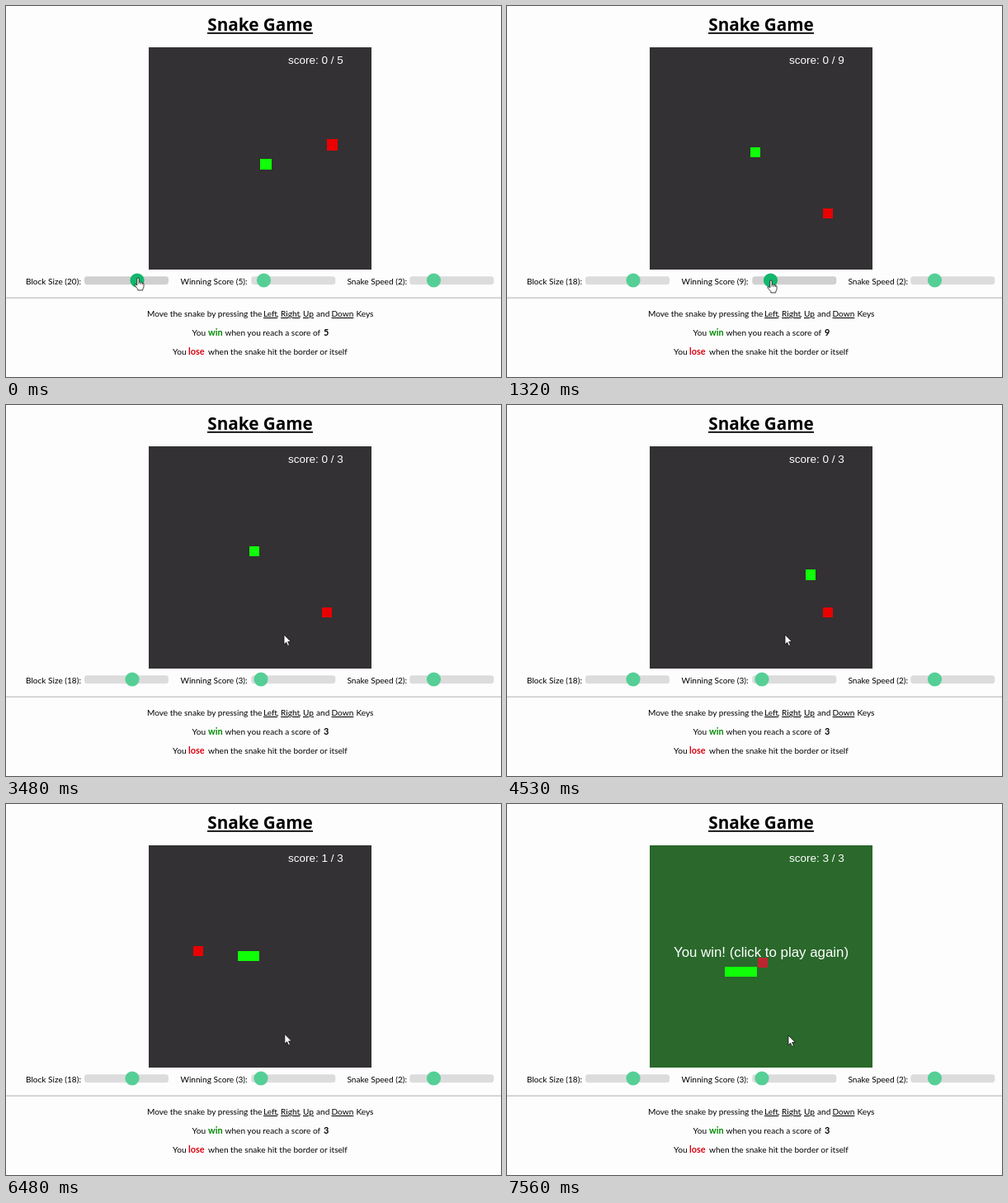
Write an HTML page that moves like this. It is 600 by 449 pixels and loops after 7590 ms.

```html
<!DOCTYPE html>
<html lang="en">
<head>
<meta charset="utf-8">
<title>Snake Game</title>
<style>
  html, body { margin: 0; width: 100%; height: 100%; overflow: hidden; background: #fefdfe; }
  svg { display: block; width: 600px; height: 449px; }
  text { font: 10.1px Lato, sans-serif; fill: #000; white-space: pre; }
  .title { font: 700 20.7px "Open Sans", sans-serif; text-anchor: middle; }
  .key { text-decoration: underline; text-underline-offset: 1.5px; }
  .bold { font-size: 10.9px; font-weight: 700; }
  .win { fill: #008a00; }
  .lose { fill: #d8000c; }
  .board { font: 13.5px "Liberation Sans", Arial, sans-serif; fill: #fff; }
  .banner { font-size: 16.875px; text-anchor: middle; }
  .track { fill: #dcdcdd; }
  .thumb { fill: #55cf96; }
  .hover .track { fill: #d0d0d1; }
  .hover .thumb { fill: #12b76c; }
  #canvas, #food, #snake { shape-rendering: crispEdges; }
</style>
</head>
<body>
<svg id="stage" viewBox="0 0 600 449">
  <text class="title" x="308" y="30">Snake Game</text>
  <path d="M244 32.9H372" stroke="#000" stroke-width="1.8"/>
  <rect id="canvas" x="173" y="50" width="270" height="269"/>
  <rect id="food"/>
  <path id="snake" fill="#10ff08"/>
  <text id="score" class="board" x="342" y="69.7"></text>
  <text id="banner" class="board banner" x="308" y="184.5">You win! (click to play again)</text>
  <g id="sliders"></g>
  <path d="M0 353.3H600" stroke="#c9c9ca" stroke-width="1.4"/>
  <g id="help"></g>
  <g id="cursor" fill="#fff" stroke="#111" stroke-width=".8" stroke-linejoin="round">
    <path id="arrow" d="M0 0V11.8L2.7 9.3L4.5 13.4L6.5 12.5L4.7 8.5H8.4Z"/>
    <g id="hand">
      <path d="M-1.2 9V1Q-1.2 0 0 0T1.2 1V5Q2.7 4.3 3.4 5.5Q4.8 5 5.4 6.2Q7 6 7 7.6V10.4Q7 12 5.8 13.4V15H-.2V13.6L-4 9.1Q-4.4 7.7-3.2 7.5Z"/>
      <path d="M1.2 5V7.6M3.4 5.5V7.8M5.4 6.2V8" fill="none"/>
    </g>
  </g>
</svg>
<script>
const LOOP = 7590, STEP = 30;
const SCALE = 0.675;            // page pixels per board unit
const SPEED = 0.125;            // snake pixels per ms
const MOVE_START = 3763;
const WIN_AT = 472, GROWTH = 13.5;

const $ = id => document.getElementById(id);

function add(parent, tag, attrs, text = '') {
  const el = document.createElementNS('http://www.w3.org/2000/svg', tag);
  set(el, attrs);
  el.textContent = text;
  return parent.appendChild(el);
}

function set(el, attrs) {
  for (const name in attrs) el.setAttribute(name, attrs[name]);
}

const show = (el, on) => { el.style.display = on ? '' : 'none'; };

function addLine(y, runs) {
  return runs.map(([x, text, cls = '']) => add($('help'), 'text', { x, y, class: cls }, text));
}

addLine(376, [
  [171, 'Move the snake by pressing the'], [312, 'Left', 'key'], [328, ','],
  [333, 'Right', 'key'], [355, ','], [360, 'Up', 'key'], [376, 'and'],
  [394.5, 'Down', 'key'], [424.5, 'Keys']
]);
const goal = addLine(399, [
  [225.5, 'You'], [245, 'win', 'bold win'], [265.5, 'when you reach a score of'], [385, '', 'bold']
])[3];
addLine(422, [
  [202, 'You'], [221, 'lose', 'bold lose'], [245, 'when the snake hit the border or itself']
]);

function makeSlider(name, labelX, trackX, thumbX) {
  const group = add($('sliders'), 'g', {});
  const label = add(group, 'text', { x: labelX, y: 337 });
  add(group, 'rect', { class: 'track', x: trackX, y: 327.2, width: 102, height: 10, rx: 3.4 });
  const thumb = add(group, 'circle', { class: 'thumb', cy: 332, r: 8.6 });
  return (value, offset, pointer) => {
    const over = pointer.y > 325 && pointer.x >= trackX && pointer.x <= trackX + 102;
    label.textContent = `${name} (${value}):`;
    thumb.setAttribute('cx', thumbX + offset);
    group.setAttribute('class', over ? 'hover' : '');
    return over;
  };
}

const blockSlider = makeSlider('Block Size', 24, 95, 159);
const goalSlider = makeSlider('Winning Score', 211.5, 297.3, 312.5);
const speedSlider = makeSlider('Snake Speed', 413.5, 489.3, 518.5);

// time, x, y of the pointer tip
const pointerKeys = [
  [0, 160, 329], [90, 160, 329], [330, 154, 330], [450, 154, 330], [860, 313, 332],
  [960, 313, 332], [1260, 320, 332], [1590, 320, 332], [2130, 309.5, 332],
  [2340, 309.5, 332], [2490, 317, 332], [2700, 317, 332], [3360, 337, 278],
  [6300, 337, 278], [6900, 341, 280], [LOOP, 341, 280]
];

function pointerAt(t) {
  const i = Math.max(1, pointerKeys.findIndex(key => key[0] >= t));
  const [t0, x0, y0] = pointerKeys[i - 1], [t1, x1, y1] = pointerKeys[i];
  const k = (t - t0) / (t1 - t0), ease = k * k * (3 - 2 * k);
  return { x: x0 + (x1 - x0) * ease, y: y0 + (y1 - y0) * ease };
}

// top-left corner of the head at each turn
const route = [
  [294.5, 171], [362, 171], [362, 240], [384, 240], [384, 248],
  [308, 248], [308, 177.5], [228, 177.5], [228, 196.5], [290.8, 196.5]
];

function cellStrip([x0, y0], [x1, y1], size) {
  const left = Math.min(x0, x1), top = Math.min(y0, y1);
  return `M${left} ${top}H${Math.max(x0, x1) + size}V${Math.max(y0, y1) + size}H${left}Z`;
}

function snakePath(tail, head, size) {
  let start = 0, d = '';
  for (let i = 1; i < route.length; i++) {
    const [ax, ay] = route[i - 1], [bx, by] = route[i];
    const length = Math.abs(bx - ax) + Math.abs(by - ay);
    const from = Math.max(tail - start, 0), to = Math.min(head - start, length);
    const point = s => [ax + (bx - ax) * s / length, ay + (by - ay) * s / length];
    if (to >= from) d += cellStrip(point(from), point(to), size);
    start += length;
  }
  return d;
}

const startFood = { 20: [388.7, 161], 19: [250, 262], 18: [383.2, 245] };
const laterFood = [[227, 172], [304, 186]];

function draw(t) {
  const pointer = pointerAt(t);
  const block = t < 450 ? Math.round(20 + (pointer.x - 160) / 3) : 18;
  const target = t < 960 ? 5 : t < 2340 ? Math.round(5 + (pointer.x - 313) / 1.75) : 3;
  const size = block * SCALE;

  let head = Math.max(0, (t - MOVE_START) * SPEED);
  const won = head >= WIN_AT;
  if (won) head = 474.8;
  const score = won ? 3 : head >= 382 ? 2 : head >= 145.5 ? 1 : 0;
  const tail = Math.max(0, head - GROWTH * Math.min(score, 2));

  const origin = [173 + 10 * block * SCALE, 49.5 + 10 * block * SCALE];
  $('snake').setAttribute('d', t < MOVE_START
    ? cellStrip(origin, origin, size) : snakePath(tail, head, size));

  const [x, y] = score ? laterFood[Math.min(score, 2) - 1] : startFood[block];
  set($('food'), { x, y, width: size, height: size, fill: won ? '#bd2630' : '#ea0000' });
  $('canvas').setAttribute('fill', won ? '#2a682b' : '#333133');
  $('score').textContent = `score: ${score} / ${target}`;
  goal.textContent = target;
  show($('banner'), won);

  const overs = [
    blockSlider(block, (block - 20) * 3, pointer),
    goalSlider(target, (target - 5) * 1.75, pointer),
    speedSlider(2, 0, pointer)
  ];
  const hovering = overs.includes(true);
  show($('hand'), hovering);
  show($('arrow'), !hovering);
  $('cursor').setAttribute('transform', `translate(${pointer.x} ${pointer.y})`);
}

function tick() {
  const t = performance.now() % LOOP;
  draw(Math.floor(t / STEP) * STEP);
  requestAnimationFrame(tick);
}
tick();
</script>
</body>
</html>
```
